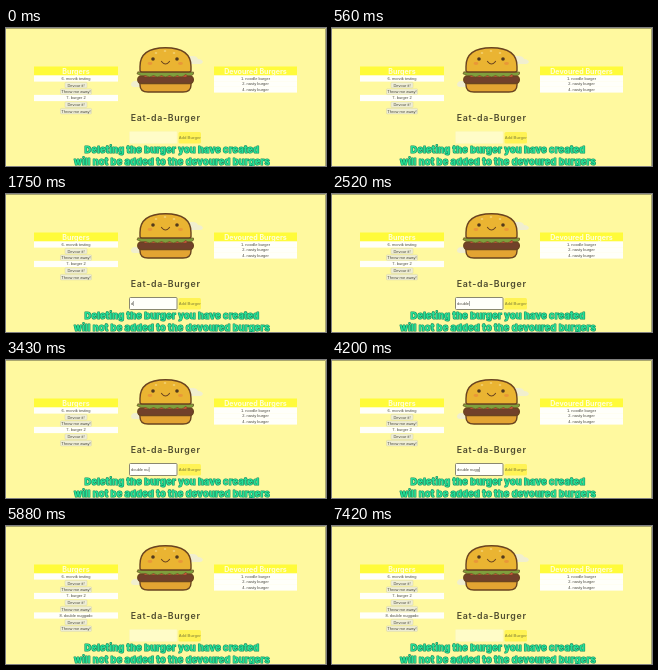
Animation, 320 px wide and 138 px high, one loop 8 s. Source, as an HTML page:

```html
<!DOCTYPE html>
<html lang="en">
<head>
<meta charset="utf-8">
<title>Eat-da-Burger</title>
<style>
html, body { margin: 0; width: 100%; height: 100%; overflow: hidden; background: #fff99f; }
svg { display: block; width: 100vw; height: 100vh; }
text { font-family: "Liberation Sans", Arial, sans-serif; font-size: 4px; fill: #48473c; }
.mid { text-anchor: middle; }
.head { font: 700 7.1px Inter, sans-serif; fill: #fffed8; text-anchor: middle; }
.title { font: 600 8.8px Inter, sans-serif; letter-spacing: .7px; fill: #4f4c30; }
.add { font-weight: 700; fill: #9c983f; text-anchor: middle; }
.menu text { font: 600 3.4px "Open Sans", sans-serif; fill: #ececec; }
.caption { font: 800 9.2px Inter, sans-serif; letter-spacing: .2px; fill: #25df95; stroke: #128a60;
  stroke-width: 1.1px; stroke-linejoin: round; paint-order: stroke; text-anchor: middle; }
</style>
</head>
<body>
<svg id="stage" viewBox="0 0 320 138" preserveAspectRatio="none">
  <rect width="320" height="138" fill="#fff99f"/>
  <path d="M0 .5H319.500V138" fill="none" stroke="#aaa76f"/>

  <g fill="#f1efcf">
    <path d="M178 28h9q4 0 5 3q4 0 5 3q-1 2-3 2h-16z"/>
    <path d="M125 56q1-3 4-3h9v6h-10q-3 0-3-3z"/>
  </g>

  <g stroke="#6a4420" stroke-width="1.4" stroke-linejoin="round" stroke-linecap="round">
    <path d="M134 54h51v3q0 7-8 7h-35q-8 0-8-7z" fill="#e3a432"/>
    <rect x="131.800" y="48" width="55.500" height="7.500" rx="3.500" fill="#71402a"/>
    <path d="M135 46h49l-4 3h-41z" fill="#c9523a" stroke-width=".4"/>
    <path d="M132 44h55.500q1 2.500-2 3.500q-4 1-6-1q-4 4-8 1q-4 3-8 0q-4 3-8 0q-4 3-8 0q-4 3-8 0q-4 1-7-1q-3-.5-.5-2.500z" fill="#7f9f3c" stroke-width=".6"/>
    <path d="M134 42.500v-4q0-18.700 25.500-18.700t25.500 18.700v4q0 1.500-2 1.500h-47q-2 0-2-1.500z" fill="#eab432"/>
    <path d="M155.500 33.500q4 5 8 0" fill="none" stroke-width="1.200"/>
  </g>
  <g fill="#533a1c"><circle cx="147" cy="31" r="1.800"/><circle cx="171" cy="31" r="1.800"/></g>
  <g fill="#e99738"><ellipse cx="144" cy="35.500" rx="2.400" ry="1.400"/><ellipse cx="174.500" cy="35.500" rx="2.400" ry="1.400"/></g>
  <g fill="#f6d982">
    <ellipse cx="150" cy="25" rx="1.300" ry=".7"/><ellipse cx="159" cy="23" rx="1.300" ry=".7"/>
    <ellipse cx="168" cy="25" rx="1.300" ry=".7"/>
  </g>

  <g id="lists"></g>
  <g id="added"></g>

  <text class="title" x="124.800" y="92.700">Eat-da-Burger</text>
  <rect id="field" x="123.500" y="103.500" width="47.500" height="12" rx="1"/>
  <text id="typed" x="125" y="111"></text>
  <rect id="caret" y="107" width=".4" height="5" fill="#333"/>
  <rect x="172.500" y="104" width="22.500" height="11.500" rx="1.500" fill="#fff355"/>
  <text class="add" x="183.700" y="111">Add Burger</text>

  <g id="menu" class="menu">
    <rect x="124" y="47.500" width="47" height="56" rx="1" fill="#37383b"/>
  </g>

  <text class="caption" x="166" y="125.300">Deleting the burger you have created</text>
  <text class="caption" x="166" y="136.800">will not be added to the devoured burgers</text>
</svg>
<script>
const LOOP = 8000, OPEN = 980, FIRST_KEY = 1680, BLUR = 5460, RELOAD = 5810;
const BURGER = "double nuggado";
// [time, letters in the field]
const KEYS = [[FIRST_KEY, 1], [2170, 4], [2240, 6], [2660, 7], [3080, 9],
  [4130, 10], [4200, 11], [4410, 12], [4760, 13], [4830, 14]];

const $ = id => document.getElementById(id);

function add(parent, tag, attrs, text) {
  const el = document.createElementNS("http://www.w3.org/2000/svg", tag);
  for (const k in attrs) el.setAttribute(k, attrs[k]);
  if (text) el.textContent = text;
  parent.append(el);
  return el;
}

function panel(x, w, title) {
  add($("lists"), "rect", { x, y: 38.5, width: w, height: 9, fill: "#fffb3a" });
  add($("lists"), "text", { x: x + w / 2, y: 45.7, class: "head" }, title);
}

function item(parent, x, w, y, name, h) {
  add(parent, "rect", { x, y, width: w, height: h, fill: "#fffffa" });
  add(parent, "text", { x: x + w / 2, y: y + h / 2 + 1.4, class: "mid" }, name);
}

function button(parent, y, w, label) {
  add(parent, "rect", { x: 70 - w / 2, y: y + .5, width: w, height: 5.5, rx: .8,
    fill: "#efeed6", stroke: "#d0cda2", "stroke-width": .4 });
  add(parent, "text", { x: 70, y: y + 4.6, class: "mid" }, label);
}

function order(parent, row, name) {
  const y = 47.4 + row * 19.5;
  item(parent, 28, 84, y, name, 6.2);
  button(parent, y + 6.5, 22, "Devour it!");
  button(parent, y + 13, 31, "Throw me away!");
}

panel(28, 84, "Burgers");
order($("lists"), 0, "6. morvik testing");
order($("lists"), 1, "7. burger 2");
order($("added"), 2, "8. " + BURGER);

panel(208, 83, "Devoured Burgers");
["1. noodle burger", "2. nasty burger", "4. nasty burger"].forEach((name, i) =>
  item($("lists"), 208, 83, 47.4 + i * 5.7, name, 5.8));

["ufo burger", "nasty burger", "nell's b", "noodle burger", "testing 2", "swiss mushroom"]
  .forEach((name, i) => add($("menu"), "text", { x: 126, y: 55.6 + i * 8.5 }, name));

const show = (el, on) => el.setAttribute("visibility", on ? "visible" : "hidden");

function draw(t) {
  const focus = t >= OPEN && t < BLUR;
  let count = 0;
  if (t < RELOAD) for (const [at, n] of KEYS) if (t >= at) count = n;

  const field = $("field"), typed = $("typed");
  field.setAttribute("fill", focus ? "#fffffa" : "#fffcc8");
  field.setAttribute("stroke", focus ? "#7d7b66" : "#fbf6b8");
  field.setAttribute("stroke-width", focus ? .9 : .5);
  typed.textContent = BURGER.slice(0, count);
  $("caret").setAttribute("x", 125.3 + (count ? typed.getComputedTextLength() : 0));
  show($("caret"), focus);
  show($("menu"), t >= OPEN && t < FIRST_KEY);
  show($("added"), t >= RELOAD);
}

const start = performance.now();
function tick(now) {
  draw(Math.max(0, now - start) % LOOP);
  requestAnimationFrame(tick);
}
draw(0);
requestAnimationFrame(tick);
</script>
</body>
</html>
```
